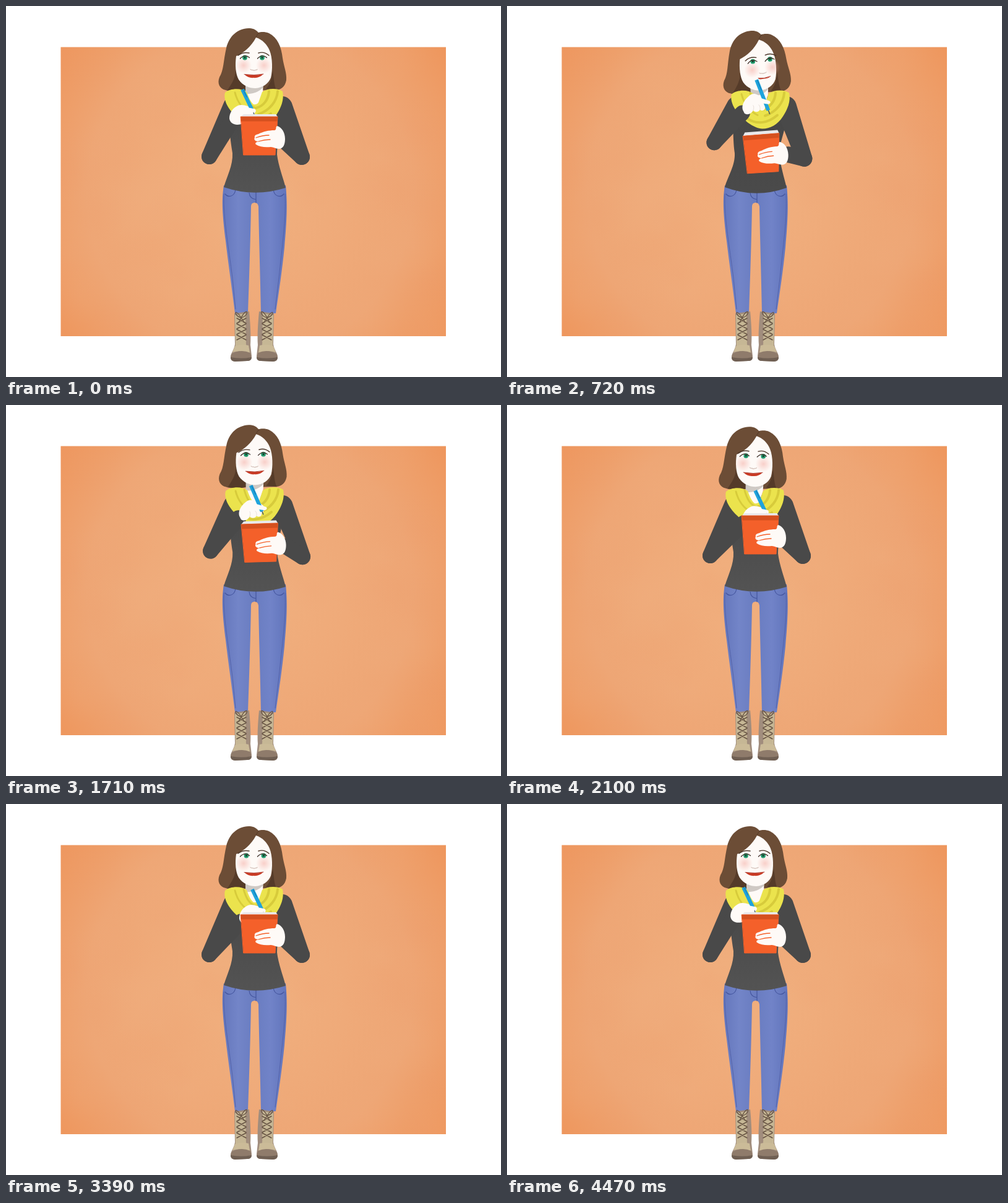
Animation, 800 px wide and 600 px high, one loop 4.5 s. Source, as an HTML page with a canvas:

```html
<!DOCTYPE html>
<html lang="en">
<head>
<meta charset="utf-8">
<title>Woman taking notes</title>
<style>
  html, body { margin: 0; width: 100%; height: 100%; overflow: hidden; background: #fff; }
  canvas { display: block; width: 800px; height: 600px; }
</style>
</head>
<body>
<canvas id="stage" width="800" height="600"></canvas>
<script>
const LOOP = 4500, STEP = 30;
const SKIN = '#fefaf7', SLEEVE = '#494949', HAIR = '#6c4d36', HAIR_DARK = '#553b29', COVER = '#f4602a';
const stage = document.getElementById('stage');
let c = stage.getContext('2d');

const fill = (d, color) => { c.fillStyle = color; c.fill(new Path2D(d)); };
const line = (d, color, w = 1) => {
  c.strokeStyle = color;
  c.lineWidth = w;
  c.lineCap = c.lineJoin = 'round';
  c.stroke(new Path2D(d));
};
const dot = (x, y, r, color) => {
  c.fillStyle = color;
  c.beginPath();
  c.arc(x, y, r, 0, 7);
  c.fill();
};
const group = (x, y, angle, draw) => {
  c.save();
  c.translate(x, y);
  c.rotate(angle);
  draw();
  c.restore();
};
const mix = (a, b, p) => a + (b - a) * p;
const mixPt = (a, b, p) => [mix(a[0], b[0], p), mix(a[1], b[1], p)];
const clamp = x => Math.max(0, Math.min(1, x));
const ease = (t, from, to) => {
  const x = clamp((t - from) / (to - from));
  return x * x * (3 - 2 * x);
};
const bump = (t, from, to) => Math.sin(Math.PI * clamp((t - from) / (to - from))) ** 2;

function fade(x, y, r, rgb, alpha) {
  const g = c.createRadialGradient(x, y, 0, x, y, r);
  g.addColorStop(0, `rgba(${rgb},${alpha})`);
  g.addColorStop(1, `rgba(${rgb},0)`);
  c.fillStyle = g;
  c.fillRect(x - r, y - r, 2 * r, 2 * r);
}

function backdrop() {
  let seed = 11;
  const rnd = () => (seed = (seed * 16807) % 2147483647) / 2147483647;
  c.fillStyle = '#fff';
  c.fillRect(0, 0, 800, 600);
  c.save();
  c.beginPath();
  c.rect(88.5, 66.6, 622.5, 467.4);
  c.clip();
  const g = c.createRadialGradient(385, 310, 60, 400, 300, 400);
  g.addColorStop(0, '#f0ae7d');
  g.addColorStop(0.6, '#eea675');
  g.addColorStop(1, '#ee955b');
  c.fillStyle = g;
  c.fillRect(88, 66, 624, 469);
  for (let i = 0; i < 60; i++) {
    const rgb = i % 2 ? '240,176,130' : '236,154,106';
    fade(88 + rnd() * 622, 67 + rnd() * 467, 25 + rnd() * 55, rgb, 0.12);
  }
  c.restore();
}

function boot() {
  fill('M369 497 L393 494 C395 515 396 535 395 548 L397 566 Q397 574 390 574 L370 575 Q362 574 363 567 C364 560 369 555 370 547Z', '#a18d7d');
  fill('M370 500 L387 497 L388 550 L371 551Z', '#c6b795');
  fill('M370 550 Q381 546 392 549 L394 561 Q378 556 366 560Z', '#cbbb98');
  fill('M364 563 Q379 554 395 561 L397 569 L363 570Z', '#8f7b6b');
  fill('M363 568 Q380 571 397 568 Q397 574 390 574 L370 575 Q363 574 363 568Z', '#6f5f53');
  let laces = '';
  for (let y = 505; y < 540; y += 9) laces += `M373 ${y} L388 ${y + 8} M388 ${y} L373 ${y + 8} `;
  line(laces, '#675444', 1.5);
  line('M380 504 C373 493 369 494 372 499 Q375 503 380 504 C386 493 391 492 389 498 Q386 503 380 504 L376 512 M380 504 L385 512', '#675444', 1.3);
}

function legs() {
  const g = c.createLinearGradient(349, 0, 454, 0);
  [[0, '#6476bc'], [0.25, '#7385c8'], [0.5, '#697cc0'], [0.75, '#7183c8'], [1, '#6174bb']]
    .forEach(s => g.addColorStop(...s));
  fill('M352 290 L452 290 C455 320 454 345 450 390 C446 430 441 462 436 497 L412 497 C411 440 409 380 408 324 Q407 318 402 318 Q396 318 396 324 C395 380 393 440 391 497 L370 497 C365 455 359 415 355 380 C350 340 348 315 352 290Z', g);
  line('M352 304 C351 345 360 390 366 440 L371 490 M451 304 C453 345 446 390 441 440 L435 490', '#5263ac', 1);
  line('M354 304 C359 310 369 309 371 297 M449 304 C444 310 434 309 432 297 M404 300 V318 M393 302 Q394 312 404 313', '#45569f', 1.2);
  boot();
  c.save();
  c.translate(802, 0);
  c.scale(-1, 1);
  boot();
  c.restore();
}

function hair() {
  fill('M392 36 C374 37 361 48 356 68 C351 90 352 104 345 115 C341 125 345 134 355 136 C363 139 372 138 384 137 L432 136 C442 137 451 132 453 120 C454 108 449 98 447 84 C445 66 439 51 425 44 C418 41 411 42 408 43 C403 37 398 36 392 36Z', HAIR);
  fill('M371 104 C371 118 363 128 358 136 Q374 140 390 136 L390 122Z', HAIR_DARK);
  fill('M431 104 C430 118 426 128 420 134 L437 136 C433 128 433 116 431 104Z', HAIR_DARK);
}

function face() {
  fill('M388 122 L388 143 L396 162 L408 162 L415 140 L416 122Z', SKIN);
  fill('M387 124 L387 142 C396 143 408 140 415 132 L416 124Z', '#cfc9c4');
  fill('M404 51 C396 66 384 76 372 81 C370 95 371 110 376 119 C383 129 393 133 403 133 C415 132 424 126 428 116 C431 104 431 84 426 72 C422 62 414 54 404 51Z', SKIN);
  line('M404 50 Q406 46 409 43', HAIR_DARK, 1);
}

function eye(x, look, lift) {
  fill(`M${x - 7} 1 Q${x} -6 ${x + 7} 0 Q${x} 5 ${x - 7} 1Z`, '#fff');
  dot(x + look, -lift, 3.9, '#25a071');
  dot(x + look, -lift, 1.5, '#17352b');
  line(`M${x - 7.5} 1 Q${x} -7 ${x + 7.5} -0.5`, '#3b2a22', 1.3);
}

// Coordinates are relative to the point between the eyes
function features(f, look) {
  fade(-16, 12, 13, '243,165,155', 0.5);
  fade(17, 12, 13, '243,165,155', 0.5);
  eye(-14, look, 0.5 + f);
  eye(14, look, 0.5 + f);
  line(`M-25 -4 Q-17 -10 -7 ${-8 + f}`, '#4a3528', 1.4);
  line(`M8 ${-8 - f} Q17 ${-11 - f} 25 ${-4 - 2 * f}`, '#4a3528', 1.4);
  line('M-5 18.5 Q-3 20 -1 19.5 Q1 21 3 19.5 Q5 20 6 18.5', '#d8c6bf', 1.4);
  const l = mix(-15, -8, f), r = mix(16, 12, f), low = mix(33, 29.5, f);
  fill(`M${l} 26.5 Q-6 27.5 0 27.5 Q9 27.5 ${r} 26 Q9 ${low} 0 ${low - 1} Q-8 ${low} ${l} 26.5Z`, '#c93a24');
  line(`M${l} 26.5 Q1 29 ${r} 26`, '#a5352a', 0.8);
}

function torso(b) {
  const s = 4 * b, w = 2 * b;
  const g = c.createLinearGradient(0, 145, 0, 300);
  g.addColorStop(0, '#464646');
  g.addColorStop(1, b > 0.5 ? '#4a4a4a' : '#535353');
  fill(`M${368 + s} 146 L${434 + s} 146 C${448 + s} 147 ${455 + s} 150 ${460 + s} 160 L${446 + s} 190 C${444 + s} 207 ${438 + w} 222 ${438 + w} 240 C${440 + w} 258 448 278 452 294 Q402 ${310 + w} 352 293 C357 275 ${367 + w} 258 ${366 + w} 238 C${364 + w} 225 ${362 + s} 212 ${361 + s} 195 L${352 + s} 160 Q${354 + s} 148 ${368 + s} 146Z`, g);
}

function scarf() {
  fill('M354 140 C362 133 380 132 389 139 C392 147 395 155 400 159 Q405 160 408 156 L414 139 C424 132 440 133 447 138 C450 152 444 165 437 176 C428 190 416 196 404 196 C390 196 370 180 360 165 C354 156 352 146 354 140Z', '#ebe34d');
  line('M370 140 C374 156 384 168 396 174 M384 138 C388 152 393 162 404 165', '#d7cb3b', 3);
  line('M439 138 C438 154 426 169 408 175 M425 138 C424 152 416 162 404 165', '#d7cb3b', 4);
  line('M380 180 C394 189 412 188 428 174', '#d7cb3b', 4);
}

// Tapered limb with rounded ends
function limb(a, b, ra, rb) {
  const turn = Math.atan2(b[1] - a[1], b[0] - a[0]);
  const side = turn + Math.acos((ra - rb) / Math.hypot(b[0] - a[0], b[1] - a[1]));
  const back = 2 * turn - side;
  c.fillStyle = SLEEVE;
  c.beginPath();
  c.arc(...a, ra, side, back + 2 * Math.PI);
  c.arc(...b, rb, back, side);
  c.fill();
}

function pen(top, tip) {
  const grip = mixPt(top, tip, 0.8), nib = mixPt(top, tip, 0.9);
  line(`M${grip} L${tip}`, '#4b5a60', 1.6);
  c.lineCap = 'butt';
  c.strokeStyle = '#1fa3dc';
  c.lineWidth = 6;
  c.beginPath();
  c.moveTo(...top);
  c.lineTo(...nib);
  c.stroke();
  const clip = mixPt(top, tip, 0.3);
  line(`M${top[0] + 1.5} ${top[1] + 1} L${clip[0] + 1.5} ${clip[1]}`, '#1784be', 1.5);
}

function writingHand(p, pos, top, tip) {
  if (p > 0.35) {
    group(...pos, 0, () =>
      fill('M-19 8 C-21 0 -16 -8 -10 -13 C-6 -18 0 -19 5 -16 C11 -14 17 -12 20 -8 C23 -3 20 3 17 4 C18 9 12 11 9 8 C6 13 0 12 -2 9 C-5 15 -12 17 -16 14Z', SKIN));
    pen(top, tip);
    group(...pos, 0, () => {
      fill('M5 -12 C13 -10 20 -8 25 -6 Q27 -2 22 -1 C15 -2 9 -3 4 -5Z', SKIN);
      line('M9 8 Q10 3 7 0 M-2 9 Q0 4 -2 1', '#e6dcd5', 0.9);
    });
  } else {
    group(...pos, 0, () =>
      fill('M-24 5 C-24 -4 -19 -12 -10 -16 C-3 -19 7 -15 17 -10 L19 -7 L17 -4 L18 8 L0 12 C-10 17 -22 16 -24 5Z', SKIN));
    pen(top, tip);
    group(...pos, 0, () =>
      fill('M-3 -13 C5 -13 13 -12 18 -10 Q20 -7 15 -6 L14 -2 L4 1 L-6 -6Z', SKIN));
  }
}

function notebook(p) {
  const tl = mixPt([379.5, 179], [382, 219], p), tr = mixPt([439, 179], [440, 213], p);
  const br = mixPt([435, 241], [440, 275], p), bl = mixPt([384, 241], [390, 279], p);
  const pl = mixPt([384, 175], [384.5, 212.5], p), pr = mixPt([436, 175], [437.5, 207.5], p);
  const panel = k => `M${tl} L${tr} L${mixPt(tr, br, k)} L${mixPt(tl, bl, k)}Z`;
  fill(`M${pl} L${pr} L${tr} L${tl}Z`, '#e9e9ec');
  fill(panel(1), COVER);
  line(panel(1), COVER, 1);
  fill(panel(0.12), '#d5501f');
}

function holdingHand(p) {
  group(mix(427, 431.5, p), mix(213, 246.5, p), -0.05 * p, () => {
    fill('M11 -19 C19 -17 24 -8 24 2 C24 11 21 18 14 18 C9 18 5 15 1 15 C-8 16 -17 15 -23 11 C-25 9 -23 7 -19 6 C-24 6 -27 3 -25 0 C-26 -3 -24 -5 -19 -6 C-11 -10 -3 -12 7 -12 C11 -13 8 -17 11 -19Z', SKIN);
    line('M-23 0 Q-12 -4 -2 -4 M-19 6 Q-9 3 0 3', COVER, 1.3);
  });
}

function pose(t) {
  const out = t >= 1410;
  const arm = out ? 1 - ease(t, 1380, 1930) : ease(t, 300, 900);
  const head = out
    ? 1 - ease(t, 1380, 1800) - 0.25 * bump(t, 1680, 2460)
    : ease(t, 300, 680) + 0.2 * bump(t, 560, 900);
  const lift = -4.5 * bump(t, 1530, 1980);
  // Side to side strokes of the pen that die out at the loop end
  const left = LOOP - t;
  const w = out ? 15.5 * (1 - Math.cos(2 * Math.PI * left / 885)) * clamp(0.3 + left / 900) : 0;
  const drop = out ? 3 * clamp(left / 500 - 0.06) + Math.min(w, 6) * 0.15 * Math.sin(t / 45) : 0;
  return { arm, head, lift, w: w * (1 - arm), drop: drop * (1 - arm) };
}

function render(t) {
  const { arm, head, lift, w, drop } = pose(t);
  const b = clamp(head);
  const moved = (a, z) => {
    const q = mixPt(a, z, arm);
    return [q[0] + w, q[1] + drop];
  };
  const elbow = mixPt([328.5, 243.5], [337.5, 211.5], arm ** 1.4);
  const wrist = moved([364, 187], [385, 169]);
  const elbow2 = mixPt([478, 244], [481, 247.5], arm);
  const headGroup = draw => group(402 + 5 * head, 120 + 3 * head + lift, -0.035 * head, () => {
    c.translate(-402, -120);
    draw();
  });

  c.drawImage(base, 0, 0);
  headGroup(hair);
  torso(b);
  limb([367.5 + 4 * b, 162], elbow, 16.5, 12.5);
  limb([446 + 5 * b, 163], elbow2, 17, 13);
  limb(elbow2, mixPt([451, 219], [455, 246], arm), 13, 13);
  headGroup(face);
  group(400 + 8.8 * head, 84 + 4.5 * head + lift, -0.11 * head,
    () => features(b, mix(Math.min(2.4, w * 0.25), 0.8, b)));
  group(9 * b, 2.5 * b + lift * 0.3, 0, scarf);
  limb(elbow, wrist, 12.5, 12.5);
  writingHand(arm, moved([385, 177], [404, 155]), moved([382, 135], [409, 115]), moved([401, 175], [431, 174]));
  notebook(arm);
  holdingHand(arm);
}

// Still parts are drawn once
const base = document.createElement('canvas');
base.width = 800;
base.height = 600;
const screen = c;
c = base.getContext('2d');
backdrop();
legs();
c = screen;

const start = performance.now();
function tick() {
  const t = (performance.now() - start) % LOOP;
  render(Math.floor(t / STEP) * STEP);
  requestAnimationFrame(tick);
}
tick();
</script>
</body>
</html>
```
